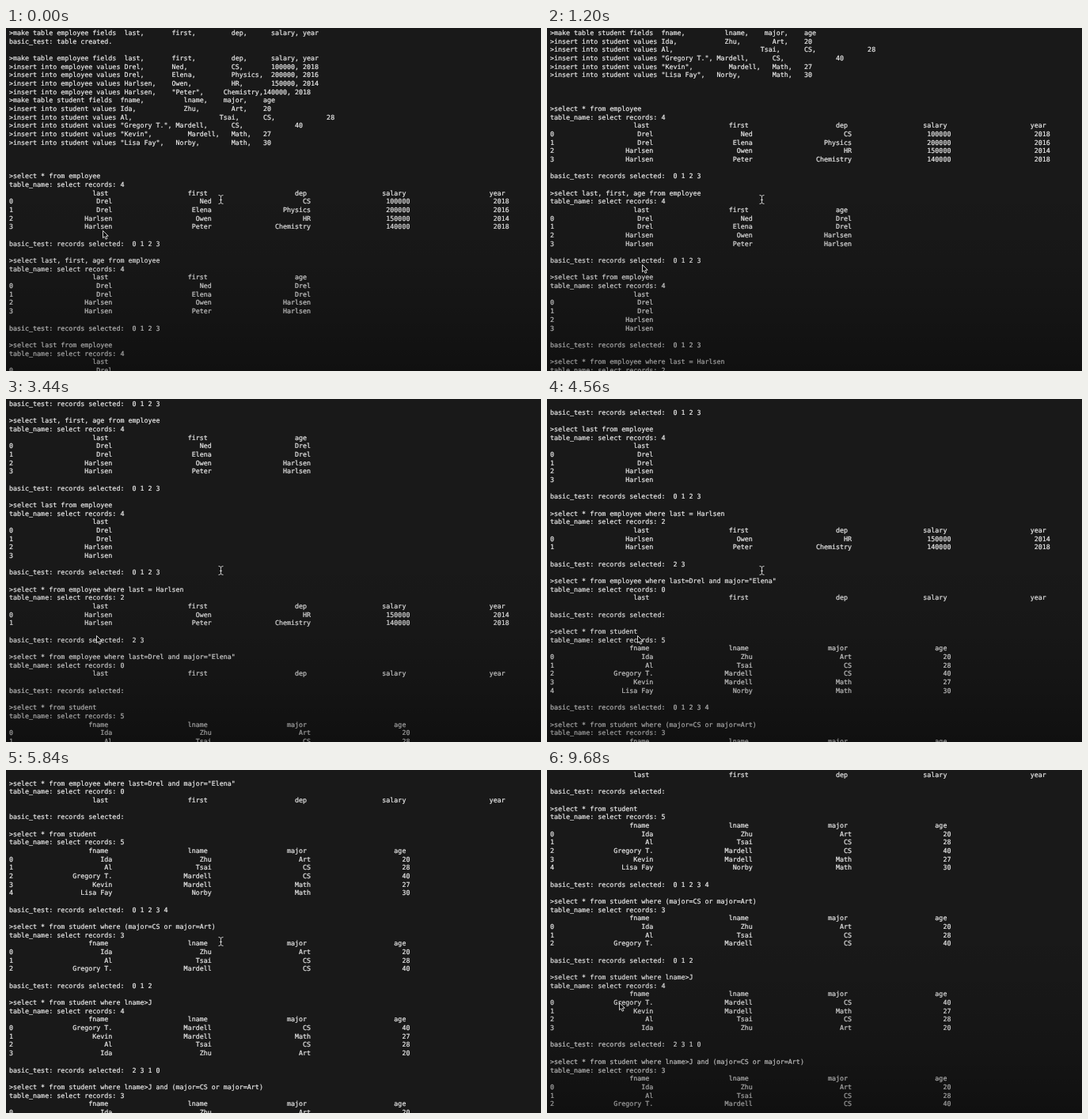
Recreate the animation shown at these times as an HTML page. Size 676 by 434 pixels, loop 9.84 s.

```html
<!DOCTYPE html>
<html lang="en">
<head>
<meta charset="utf-8">
<title>Table queries in a terminal</title>
<style>
  html, body { margin: 0; width: 100%; height: 100%; overflow: hidden; background: #191919; }
  #stage { position: relative; width: 676px; height: 434px; overflow: hidden; }
  #stage > * { position: absolute; left: 0; top: 0; }
  #stage > pre {
    left: 4px; top: -9.7px; margin: 0; color: #e8e8e8;
    font: 8.349px/10.667px "DejaVu Sans Mono", monospace;
    -webkit-text-stroke: .22px #e8e8e8;
    text-rendering: geometricPrecision; font-variant-ligatures: none;
  }
  #shade {
    width: 676px; height: 434px;
    background: linear-gradient(transparent 200px, #00000014 290px, #00000030 360px, #0000005c 434px);
  }
</style>
</head>
<body>
<div id="stage">
  <pre id="terminal"></pre>
  <div id="shade"></div>
  <svg width="676" height="434">
    <path id="beam" d="M268.5 211.5q3 0 3 2v7q0 2-3 2M274.5 211.5q-3 0-3 2v7q0 2 3 2M270 217.5h3"
      fill="none" stroke="#c8c8c8"/>
    <path id="arrow" d="M0 0v9.2l2.1-1.9 1.5 3.4 1.7-.7-1.5-3.3h2.9z"
      fill="#000" stroke="#e8e8e8" stroke-width=".9"/>
  </svg>
</div>
<script>
const LOOP = 9840, STEP = 80, COLUMN = 25, VISIBLE_ROWS = 42;

const employeeFields = ['last', 'first', 'dep', 'salary', 'year'];
const employees = [
  ['Drel', 'Ned', 'CS', '100000', '2018'],
  ['Drel', 'Elena', 'Physics', '200000', '2016'],
  ['Harlsen', 'Owen', 'HR', '150000', '2014'],
  ['Harlsen', 'Peter', 'Chemistry', '140000', '2018'],
];
const studentFields = ['fname', 'lname', 'major', 'age'];
const students = [
  ['Ida', 'Zhu', 'Art', '20'],
  ['Al', 'Tsai', 'CS', '28'],
  ['Gregory T.', 'Mardell', 'CS', '40'],
  ['Kevin', 'Mardell', 'Math', '27'],
  ['Lisa Fay', 'Norby', 'Math', '30'],
];

// Places text pieces at given character columns: place(text, column, text, column, text...)
const place = (line, ...pieces) => {
  for (let i = 0; i < pieces.length; i += 2) line = line.padEnd(pieces[i]) + pieces[i + 1];
  return line;
};
const makeEmployees = place('>make table employee fields  last,', 41, 'first,', 56, 'dep,', 66, 'salary, year');
const addEmployee = (...pieces) => place('>insert into employee values ', 29, ...pieces);
const addStudent = (...pieces) => place('>insert into student values ', 28, ...pieces);

function query(command, fields, people, ids, shown = fields) {
  const cells = list => list.map(text => text.padStart(COLUMN)).join('');
  const valueOf = (person, field) => person[Math.max(0, fields.indexOf(field))];
  return [
    '>select ' + command,
    'table_name: select records: ' + ids.length,
    cells(shown),
    ...ids.map((id, row) => row + cells(shown.map(field => valueOf(people[id], field)))),
    '',
    'basic_test: records selected: ' + ids.map(id => ' ' + id).join(''),
    '',
  ];
}
const askEmployees = (command, ids, shown) => query(command, employeeFields, employees, ids, shown);
const askStudents = (where, ids) => query('* from student' + where, studentFields, students, ids);

const lines = [
  makeEmployees,
  'basic_test: table created.',
  '',
  makeEmployees,
  addEmployee('Drel,', 41, 'Ned,', 56, 'CS,', 66, '100000, 2018'),
  addEmployee('Drel,', 41, 'Elena,', 56, 'Physics,', 66, '200000, 2016'),
  addEmployee('Harlsen,', 41, 'Owen,', 56, 'HR,', 66, '150000, 2014'),
  addEmployee('Harlsen,', 41, '"Peter",', 54, 'Chemistry,140000, 2018'),
  place('>make table student fields  fname,', 44, 'lname,', 54, 'major,', 64, 'age'),
  addStudent('Ida,', 44, 'Zhu,', 56, 'Art,', 64, '20'),
  addStudent('Al,', 53, 'Tsai,', 64, 'CS,', 80, '28'),
  addStudent('"Gregory T.",', 42, 'Mardell,', 56, 'CS,', 72, '40'),
  addStudent('"Kevin",', 45, 'Mardell,', 56, 'Math,', 64, '27'),
  addStudent('"Lisa Fay",', 42, 'Norby,', 56, 'Math,', 64, '30'),
  '', '', '',
  ...askEmployees('* from employee', [0, 1, 2, 3]),
  ...askEmployees('last, first, age from employee', [0, 1, 2, 3], ['last', 'first', 'age']),
  ...askEmployees('last from employee', [0, 1, 2, 3], ['last']),
  ...askEmployees('* from employee where last = Harlsen', [2, 3]),
  ...askEmployees('* from employee where last=Drel and major="Elena"', []),
  ...askStudents('', [0, 1, 2, 3, 4]),
  ...askStudents(' where (major=CS or major=Art)', [0, 1, 2]),
  ...askStudents(' where lname>J', [2, 3, 1, 0]),
  ...askStudents(' where lname>J and (major=CS or major=Art)', [0, 1, 2]).slice(0, 6),
];

// Scroll gestures: start time, then the top line after each step
const gestures = [
  [80, 1, 2, 2, 3],
  [720, 3, 4, 5, 6, 7, 8, 8],
  [1440, 9, 10, 12, 13, 15, 16, 17, 18, 19, 20, 21, 22],
  [2640, 23, 24],
  [3440, 25, 27, 28],
  [4000, 30, 32],
  [4560, 34, 37, 39, 41, 42],
  [5120, 44, 47, 49, 50],
  [5760, 52, 54],
  [6160, 55, 56, 57],
];
function topLine(t) {
  const gesture = gestures.findLast(([start]) => start <= t);
  if (!gesture) return 0;
  const [start, ...tops] = gesture;
  return tops[Math.min(tops.length - 1, Math.floor((t - start) / STEP))];
}

// Rises from 0 to 1 in steps, reaching 1 at the last one
const ramp = (t, first, last) => Math.min(1, Math.max(0, (t - first + STEP) / (last - first + STEP)));

const [terminal, shade, beam, arrow] =
  ['terminal', 'shade', 'beam', 'arrow'].map(id => document.getElementById(id));
let shownTop = -1;

function draw() {
  const t = Math.floor(performance.now() % LOOP / STEP) * STEP;
  const top = topLine(t);
  if (top !== shownTop) {
    terminal.textContent = ['', ...lines].slice(top, top + VISIBLE_ROWS).join('\n');
    shownTop = top;
  }

  const late = t >= 8800;
  const hidden = 1 - ramp(t, 5120, 5360);
  shade.style.opacity = late ? ramp(t, 8800, 9120) : hidden;
  beam.style.opacity = 1 - ramp(t, 7120, 7360);
  arrow.style.opacity = late ? 1 : hidden;

  const x = late ? 87 + 4.5 * ramp(t, 9360, 9680)
    : 122.5 - 2 * ramp(t, 720, 1200) - 6 * ramp(t, 1440, 2320);
  const y = late ? 294.5 : 256.5 + 43 * ramp(t, 720, 1200);
  arrow.setAttribute('transform', `translate(${x} ${y})`);
  requestAnimationFrame(draw);
}
draw();
</script>
</body>
</html>
```
